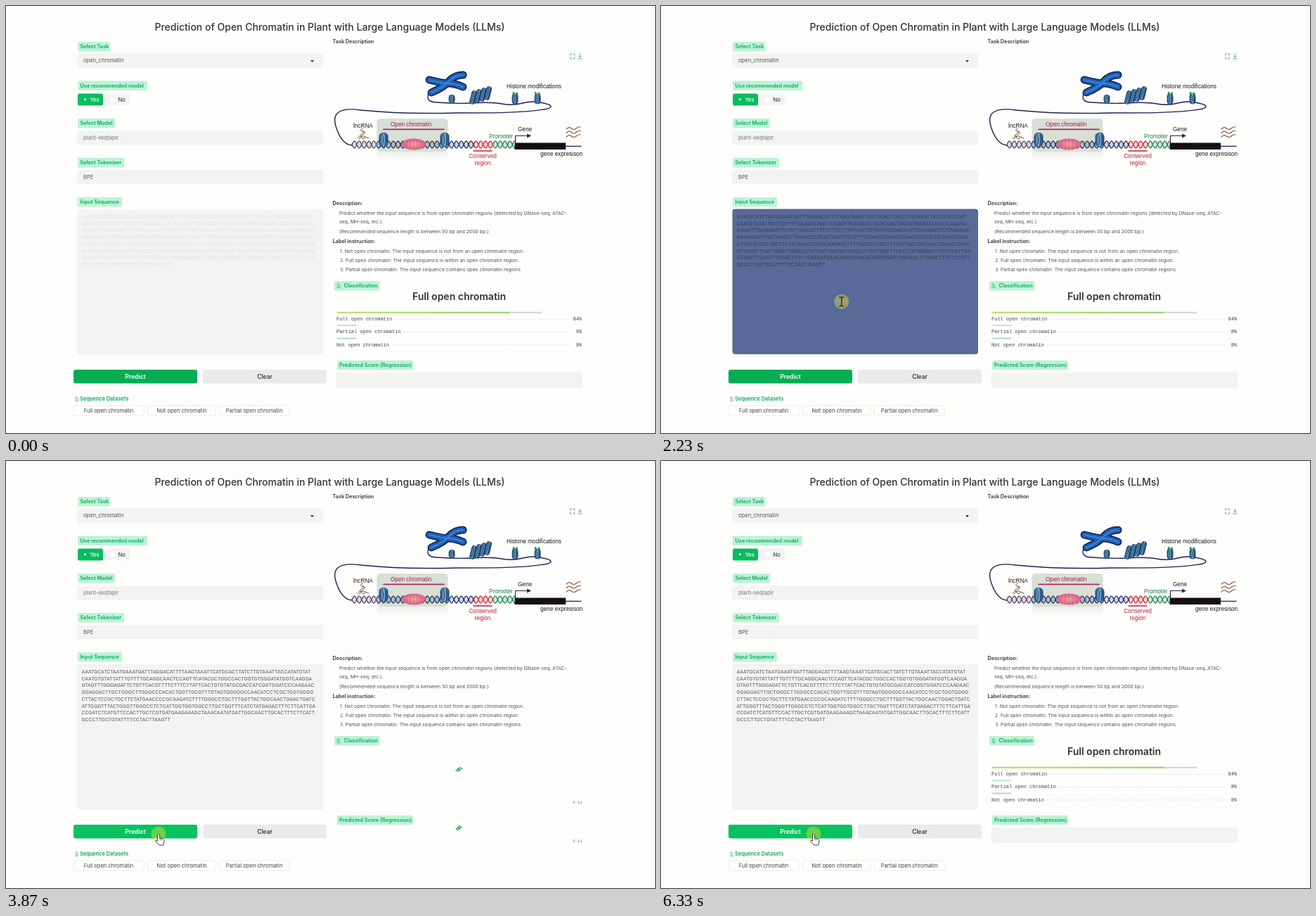
These frames come from a looping animation (923x607 px, 6360 ms). An HTML page:

```html
<!DOCTYPE html>
<html lang="en">
<head>
<meta charset="utf-8">
<title>Chromatin prediction</title>
<style>
html, body { margin: 0; width: 100%; height: 100%; overflow: hidden; background: #fdfdfc; }
svg { display: block; width: 100%; height: 100%; }
text { white-space: pre; }
</style>
</head>
<body>
<svg id="stage" viewBox="0 0 923 607"></svg>
<script>
const SANS = "Inter, sans-serif", ARIAL = "'Liberation Sans', sans-serif", MONO = "'Liberation Mono', monospace";
const GREEN = "#0fa65c", PILL = "#bbf3d6", FIELD = "#f3f3f2", INK = "#333", NAVY = "#1c2350";

// ---- drawing helpers ----
const rect = (x, y, w, h, fill, r = 2, extra = "") =>
  `<rect x="${x}" y="${y}" width="${w}" height="${h}" rx="${r}" fill="${fill}" ${extra}/>`;
const text = (x, y, s, { size = 7.6, fill = "#555", weight = 400, anchor = "start", font = SANS } = {}) =>
  `<text x="${x}" y="${y}" font-size="${size}" fill="${fill}" font-weight="${weight}" text-anchor="${anchor}" font-family="${font}">${s}</text>`;
const line = (d, stroke, width = 1, extra = "") =>
  `<path d="${d}" fill="none" stroke="${stroke}" stroke-width="${width}" stroke-linecap="round" stroke-linejoin="round" ${extra}/>`;
const group = (id, body, extra = "") => `<g id="${id}" ${extra}>${body}</g>`;
const listIcon = (x, y) => line(`M${x} ${y - 2.5}h1M${x} ${y}h1M${x} ${y + 2.5}h4M${x + 2} ${y - 2.5}h1M${x + 2} ${y}h2`, GREEN, .8);
const pill = (x, y, w, s, dx = 3.5) =>
  rect(x, y, w, 13.5, PILL) + text(x + dx, y + 9.3, s, { size: 7.3, fill: GREEN, weight: 600 });
const field = (x, y, w, h) => rect(x, y, w, h, FIELD, 2, 'stroke="#ededea" stroke-width=".6"');
const bold = (x, y, s) => text(x, y, s, { size: 7.25, fill: INK, weight: 600 });
const label = (x, y, s, fill = "#1a1a1a", anchor = "start") => text(x, y, s, { size: 8.2, fill, anchor, font: ARIAL });

// ---- left column ----
const sequence = [
  "AAATGCATCTAATGAAATGATTTAGGACATTTTAAGTAAATTCATGCACTTATCTTGTAAATTACCATATGTAT",
  "CAATGTGTATTATTTGTTTTGCAGGCAACTCCAGTTCATACGCTGGCCACTGGTGTGGGATATGGTCAAGGA",
  "GTAGTTTGGGAGATTCTGTTCACGTTTTCTTTCTTATTCACTGTGTATGCGACCATCGGTGGATCCCAAGAAC",
  "GGAGGACTTGCTGGGCTTGGGCCCACACTGGTTGCGTTTGTAGTGGGGGCCAACATCCTCGCTGGTGGGG",
  "CTTACTCCGCTGCTTCTATGAACCCCGCAAGATCTTTTGGGCCTGCTTTGGTTACTGGCAACTGGACTGATC",
  "ATTGGGTTTACTGGGTTGGGCCTCTCATTGGTGGTGGCCTTGCTGGTTTCATCTATGAGACTTTCTTCATTGA",
  "CCGATCTCATGTTCCACTTGCTCGTGATGAAGAAAGCTAAACAATATGATTGGCAACTTGCACTTTCTTCATT",
  "GCCCTTGCTGTATTTTCCTACTTAAGTT"
];
const button = (x, w, s) =>
  rect(x, 568, w, 14, "#fefefd", 2, 'stroke="#e8e8df" stroke-width=".8"') +
  text(x + w / 2, 577.5, s, { anchor: "middle", fill: "#444" });

const leftColumn = () =>
  pill(102, 51, 46, "Select Task") + field(102, 68, 348.5, 19.5) + text(110, 80.4, "open_chromatin") +
  '<path d="M433 77h5l-2.5 3z" fill="#333"/>' +
  pill(102, 106.5, 99, "Use recommended model") +
  rect(102, 124.5, 36, 17, "#08bd5e", 2.5) + '<circle cx="112.5" cy="132.8" r="1.5" fill="#fff"/>' +
  text(119.5, 135.5, "Yes", { fill: "#fff", weight: 500 }) +
  rect(141, 124.5, 35, 17, "#f3f3f2", 2.5) + '<circle cx="151.5" cy="132.8" r="3.6" fill="#fff"/>' +
  text(159.5, 135.5, "No", { fill: "#444", weight: 500 }) +
  pill(102, 160, 53, "Select Model") + field(102, 178, 348.5, 19) + text(110, 190, "plant-seqtapir", { fill: "#777" }) +
  pill(102, 216, 66, "Select Tokenizer") + field(102, 233.5, 348.5, 19) + text(110, 245.6, "BPE") +
  pill(102, 272, 63, "Input Sequence") + field(102, 289.5, 348.5, 205.5) +
  rect(102, 289, 348.5, 205.5, "#576a99", 3, 'id="select" stroke="#4a5670" stroke-width=".8"') +
  group("seq", sequence.map((s, i) => text(107.5, 301.8 + i * 9.75, s, { size: 6.75, fill: "currentColor" })).join("")) +
  rect(96, 517, 176, 19.5, "#05ad54", 3, 'id="predict"') +
  text(184, 529.8, "Predict", { size: 8.6, fill: "#fff", weight: 600, anchor: "middle" }) +
  rect(280, 517, 176, 19.5, "#eaeaea", 3) +
  text(368, 529.8, "Clear", { size: 8.4, fill: "#3a3a3a", weight: 600, anchor: "middle" }) +
  listIcon(98.5, 558.8) + text(105, 561.3, "Sequence Datasets", { size: 7.4, fill: GREEN, weight: 600 }) +
  button(96, 100, "Full open chromatin") + button(202, 96, "Not open chromatin") + button(303, 100, "Partial open chromatin");

// ---- diagram ----
function helix(x0, x1, color) {
  const strand = sign => {
    let d = "";
    for (let x = x0; x <= x1; x++) d += `${d ? "L" : "M"}${x} ${(197 + sign * 5 * Math.sin((x - 492) / 2.2)).toFixed(1)}`;
    return line(d, color, 1.3);
  };
  let rungs = "";
  for (let x = x0 + 1; x < x1; x += 2.2) {
    const h = 5 * Math.sin((x - 492) / 2.2);
    rungs += `M${x.toFixed(1)} ${(197 - h).toFixed(1)}v${(2 * h).toFixed(1)}`;
  }
  return line(rungs, color, .6, 'opacity=".7"') + strand(1) + strand(-1);
}
const nucleosome = (x, y, w, h, tilt = 0) =>
  `<g transform="translate(${x} ${y}) rotate(${tilt})">` +
  rect(-w / 2, -h / 2, w, h, "url(#drum)", w * .4, 'stroke="#17365f" stroke-width=".8"') +
  line(`M${-w * .15} ${-h * .42}q${w * .25} ${h * .42} 0 ${h * .84}M${w * .2} ${-h * .42}q${w * .2} ${h * .42} 0 ${h * .84}`, "#173457", .9) + "</g>";
const pin = (x, y) => `<circle cx="${x}" cy="${y}" r="1.5" fill="#238a55"/>` + line(`M${x} ${y}v4`, "#238a55", .8);
const wave = y => line(`M797 ${y}q3.5 -4 7 -1t7 0t6 -2`, "#8a5a3c", 1.2);
const arms = (color, width, extra) =>
  line("M602 105Q622 110 630 110T650 115M605 123Q622 116 630 107T650 98", color, width, extra);

const diagram = () =>
  line("M802.5 70v-2h2M806.5 68h2v2M808.5 73v2h-2M804.5 75h-2v-2", "#4aa3b5", .9) +
  line("M816.5 68v5M814.5 71l2 2 2-2M813.8 75h5.4", "#4aa3b5", .9) +
  line("M602 122Q595 137 613 137Q640 139 662 138Q690 136 705 139T735 138T764 138C779 141 778 145 765 147C735 152 690 152 640 152Q560 154 505 148C470 143 463 155 470 174Q478 197 492 198", NAVY, 1.4) +
  arms("#10245f", 11) + arms("#1f5fb4", 7.5) + arms("#4f9be0", 2, 'opacity=".6"') +
  nucleosome(634, 132, 8, 11) +
  [0, 1, 2, 3].map(i => nucleosome(664.5 + i * 7, 130 - i * 2, 7, 19, 14)).join("") +
  nucleosome(724, 132, 8, 14) + nucleosome(756, 132, 8, 14) + pin(722, 123.5) + pin(726.5, 124) + pin(753, 123.5) + pin(758, 124) +
  label(712, 116.5, "Histone modifications") +
  rect(527.5, 160, 101, 47, "#d8dfd5", 5) + rect(527.5, 207, 101, 13, "url(#mirror)", 3) +
  label(547, 171.3, "Open chromatin", "#9b1c50") + line("M537 175.3H623", "#b02a68", 1.7) +
  label(494, 173, "lncRNA") +
  line("M507 174q-5 3 0 4t-2 4q-4 3 2 3l-5 4M507 178q6 1 2 4t2 4l5 2M500 188q4-5 6-1t5 0", "#7a4a2c", 1) +
  helix(492, 528, "#56496c") + helix(528, 666, "#293469") + helix(666, 692, "#d42b3f") + helix(692, 724, "#23875a") +
  nucleosome(537, 190, 12, 19) + nucleosome(624, 190, 12, 19) +
  '<ellipse cx="580" cy="196.5" rx="17" ry="8" fill="url(#blob)"/>' +
  line("M570 192v9M575 191v11M580 190v13M585 191v11M590 192v9", "#b93b5c", .8, 'opacity=".6"') +
  label(687, 188, "Promoter", "#157a48") + label(728, 178, "Gene") +
  line("M724.5 194V184.5H743", "#222745", 1.2) + '<path d="M741 181.5l6 3-6 3z" fill="#222745"/>' +
  line("M796 199.3H818", NAVY, 1.3) + rect(723.5, 194.5, 72.5, 9.5, "#151010", 0) +
  wave(175) + wave(180.5) + wave(186) + label(760, 213, "gene expresison") +
  line("M665 206H691", "#c51c35", 1.5) + label(678, 216, "Conserved", "#c51c35", "middle") + label(678, 226, "region", "#c51c35", "middle");

// ---- right column ----
const para = (x, y, s) => text(x, y, s, { size: 6.85, fill: "#505050" });
const mono = (x, y, s, anchor = "start", fill = "#444") => text(x, y, s, { size: 6.95, fill, anchor, font: MONO });
const score = (y, name, pct, width, fill) =>
  rect(470.5, y, width, 2, fill, 1) + mono(470, y + 12.3, name) +
  line(`M${474 + name.length * 4.17} ${y + 10.5}H803`, "#dcdcdc", .7, 'stroke-dasharray="2 2"') + mono(819, y + 12.3, pct, "end");
const spinner = y => `<g transform="translate(644 ${y})">` +
  ["a", "b"].map(c => `<path class="ring ${c}" d="M-2.7 0L0 -1.6 2.7 0 0 1.6z" fill="none" stroke="${GREEN}" stroke-width="1.1"/>`).join("") + "</g>";
const timer = y => `<text class="timer" x="819.5" y="${y}" text-anchor="end" font-size="5.6" fill="#777" font-family="${MONO}"></text>`;

const rightColumn = () =>
  bold(464.5, 52.8, "Task Description") + bold(464.5, 283.3, "Description:") +
  para(474, 297.3, "Predict whether the input sequence is from open chromatin regions (detected by DNase-seq, ATAC-") +
  para(474, 308.6, "seq, MH-seq, etc.).") +
  para(474, 323, "(Recommended sequence length is between 50 bp and 2000 bp.)") +
  bold(464.5, 337, "Label instruction:") +
  para(475, 350.8, "1. Not open chromatin: The input sequence is not from an open chromatin region.") +
  para(475, 364, "2. Full open chromatin: The input sequence is within an open chromatin region.") +
  para(475, 377.3, "3. Partial open chromatin: The input sequence contains open chromatin regions.") +
  pill(467, 391, 64.5, "Classification", 13.5) + listIcon(471, 397.8) +
  group("result",
    text(644.5, 418, "Full open chromatin", { size: 14, fill: INK, weight: 600, anchor: "middle" }) +
    score(434.7, "Full open chromatin", "84%", 292, "url(#bar)") +
    score(453, "Partial open chromatin", "8%", 28.5, "#bfe8cf") +
    score(471.4, "Not open chromatin", "8%", 27.5, "#b4d6dc") +
    field(470, 521.5, 349, 21)) +
  pill(471, 503.8, 108, "Predicted Score (Regression)", 3) +
  group("loading", spinner(438.5) + spinner(521.8) + timer(487) + timer(542));

const cursor = group("cursor",
  '<circle r="10.5" fill="#f0e830" opacity=".42"/>' +
  group("beam", line("M-3 -6.5Q0 -6.5 0 -5Q0 -6.5 3 -6.5M0 -5V5M-3 6.5Q0 6.5 0 5Q0 6.5 3 6.5", "#222", 1.3)) +
  group("arrow", '<path d="M0 0v14l3.3-3 2.2 5 2-1-2.2-4.8h4.5z" fill="#222" stroke="#fff" stroke-width=".8"/>') +
  group("hand", '<path d="M-1.5 1q1.5-1.8 3 0v5l5 1q1.7.6 1.4 2.3l-1 6.7h-6.2L-4.2 10.5q-.3-2 1.4-1.4l1.3 1.2z" fill="#fff" stroke="#333" stroke-width=".9"/>' +
    line("M2 6v3M4.2 6.5V9", "#333", .7)));

const stops = list => list.map(([at, color, op = 1]) => `<stop offset="${at}" stop-color="${color}" stop-opacity="${op}"/>`).join("");
const defs = `<defs>
<linearGradient id="drum">${stops([[0, "#1a4477"], [.45, "#7db9de"], [1, "#1b4a80"]])}</linearGradient>
<linearGradient id="bar">${stops([[0, "#b5dd62"], [.84, "#86d462"], [.84, "#d2d0da"], [1, "#d2d0da"]])}</linearGradient>
<linearGradient id="mirror" x2="0" y2="1">${stops([[0, "#d8dfd5", .45], [1, "#d8dfd5", 0]])}</linearGradient>
<radialGradient id="blob">${stops([[0, "#f4a6b5"], [1, "#d9607c"]])}</radialGradient></defs>`;

const $ = id => document.getElementById(id);
$("stage").innerHTML = defs + rect(0, 0, 923, 607, "#fdfdfc", 0) +
  text(460.5, 34.5, "Prediction of Open Chromatin in Plant with Large Language Models (LLMs)", { size: 14, fill: INK, weight: 500, anchor: "middle" }) +
  leftColumn() + diagram() + rightColumn() + cursor;

// ---- motion ----
const LOOP = 6360;
const cursorPath = [[530, 915, 428], [630, 720, 410], [730, 430, 375], [830, 325, 357], [930, 315, 349], [1100, 315, 349],
  [1670, 337, 348], [2100, 337, 348], [2230, 257, 420], [2400, 226, 468], [2730, 216, 512], [2850, 217, 530]];
const ringPath = [[1, 1], [-1, 1], [-1, 0], [1, 0]];
const ramp = (t, a, b) => Math.min(1, Math.max(0, (t - a) / (b - a)));
const smooth = p => p * p * (3 - 2 * p);
const mix = (a, b, p) => a + (b - a) * p;
const mixColor = (a, b, p) => `rgb(${a.map((v, i) => Math.round(mix(v, b[i], p)))})`;
const show = (id, on) => $(id).style.display = on ? "" : "none";

function pointAt(t) {
  const i = cursorPath.findIndex(k => k[0] > t);
  if (i < 0) return cursorPath.at(-1).slice(1);
  if (i === 0) return cursorPath[0].slice(1);
  const [a, b] = [cursorPath[i - 1], cursorPath[i]], p = ramp(t, a[0], b[0]);
  return [mix(a[1], b[1], p), mix(a[2], b[2], p)];
}

function draw(t) {
  const [x, y] = pointAt(t);
  show("cursor", t >= 530);
  $("cursor").setAttribute("transform", `translate(${x} ${y})`);
  show("beam", y < 495);
  show("arrow", y >= 495 && y < 516);
  show("hand", y >= 516);

  const selected = ramp(t, 1100, 1670) * (1 - ramp(t, 3570, 3800));
  $("select").setAttribute("opacity", selected);
  $("seq").setAttribute("opacity", mix(.13, 1, ramp(t, 1100, 1670)));
  $("seq").setAttribute("color", mixColor([85, 85, 85], [52, 59, 84], selected));
  $("predict").setAttribute("fill", mixColor([5, 173, 84], [6, 194, 95], ramp(t, 2770, 2920)));

  const busy = t >= 3730 && t < 5430;
  show("loading", busy);
  $("result").setAttribute("opacity", busy ? 0 : t >= 5430 && t < 5530 ? .22 : 1);
  if (!busy) return;
  document.querySelectorAll(".timer").forEach(e => e.textContent = ((t - 3730) / 1000).toFixed(1) + "s");
  const step = (t - 3730) / 350 + .8, i = Math.floor(step);
  const [from, to] = [ringPath[i % 4], ringPath[(i + 1) % 4]], p = smooth(ramp(step % 1, 0, .8));
  const dx = 1.35 * mix(from[0], to[0], p), dy = 1.5 * mix(from[1], to[1], p);
  document.querySelectorAll(".ring").forEach(e => {
    const s = e.classList.contains("a") ? 1 : -1;
    e.setAttribute("transform", `translate(${s * dx} ${s * dy})`);
  });
}

const start = performance.now();
function tick() {
  draw((performance.now() - start) % LOOP);
  requestAnimationFrame(tick);
}
tick();
</script>
</body>
</html>
```
